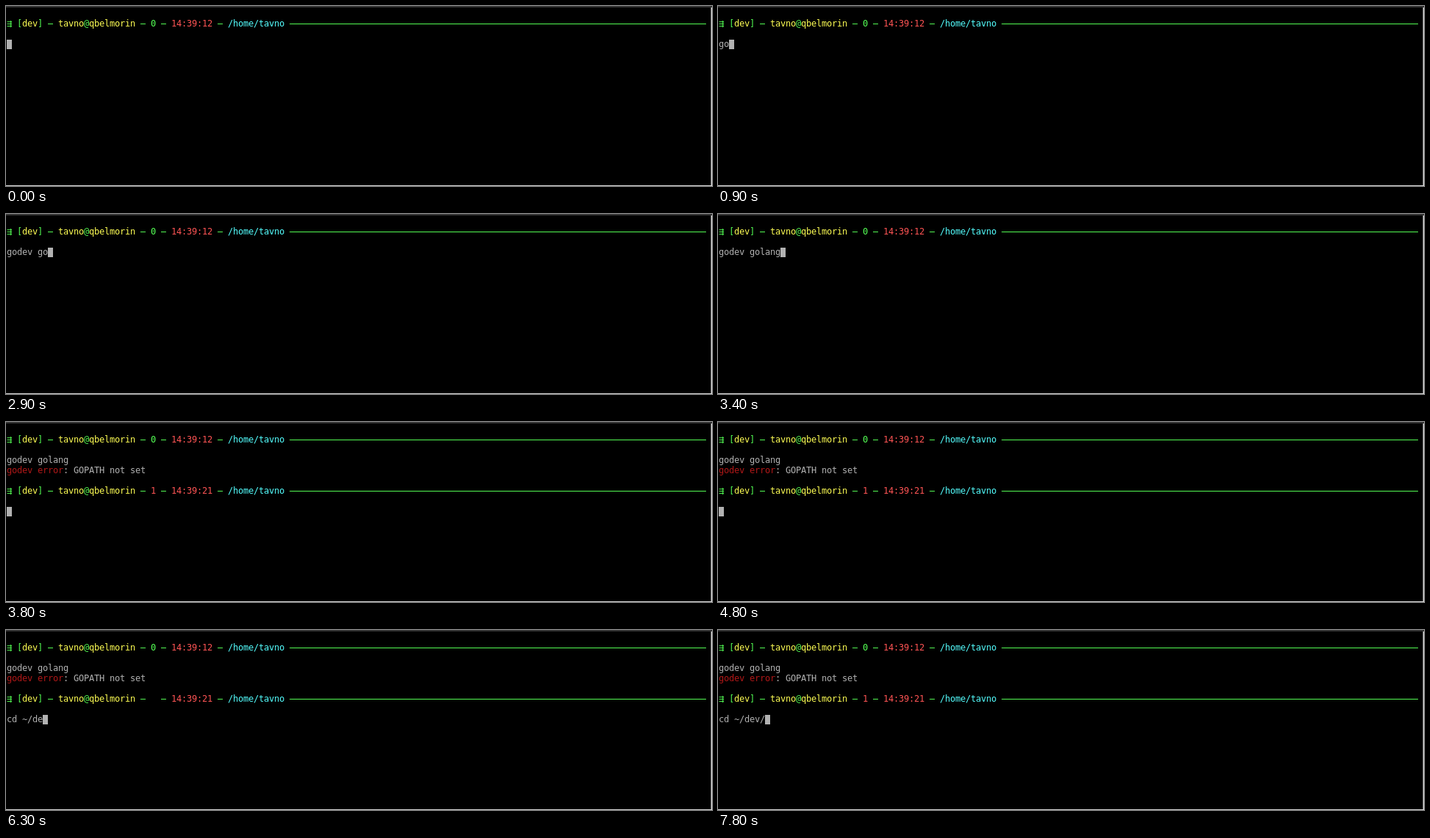
An HTML page for the animation above (8 s loop, 961 px wide and 246 px high).

```html
<!DOCTYPE html>
<html lang="en">
<head>
<meta charset="utf-8">
<title>Terminal session</title>
<style>
  html, body { margin: 0; width: 100%; height: 100%; overflow: hidden; background: #000; }
  svg { display: block; }
  text { font: 12px "DejaVu Sans Mono", monospace; white-space: pre; }
</style>
</head>
<body>
<svg id="stage" width="961" height="246" viewBox="0 0 961 246"></svg>
<script>
const LOOP = 8000, CELL = 7, LINE = 14, LEFT = 1, BASE = 28;
const GREEN = '#54ff54', YELLOW = '#ffff54', RED = '#ff5454', CYAN = '#54ffff';
const GREY = '#b2b2b2', DARK_RED = '#b21818';
const USER = 'tavno', HOST = 'qbelmorin';
const RESULT_AT = 3800, BLINK = 500;

const stage = document.getElementById('stage');
const colX = col => LEFT + col * CELL;
const rowY = row => BASE + row * LINE;

function add(parent, tag, attrs) {
  const el = document.createElementNS('http://www.w3.org/2000/svg', tag);
  for (const key in attrs) el.setAttribute(key, attrs[key]);
  return parent.appendChild(el);
}

function rect(parent, x, y, width, height, fill) {
  return add(parent, 'rect', { x, y, width, height, fill, 'shape-rendering': 'crispEdges' });
}

// Every character sits in its own terminal cell.
function setText(el, str) {
  el.setAttribute('x', [...str].map((_, i) => colX(el.col + i)).join(' '));
  el.textContent = str;
}

function write(parent, row, col, str, fill) {
  const el = add(parent, 'text', { y: rowY(row), fill });
  el.col = col;
  setText(el, str);
  return el;
}

function prompt(parent, row, status, statusColor, clock) {
  const put = (col, str, fill) => write(parent, row, col, str, fill);
  const dash = (col, cells = 1) =>
    rect(parent, colX(col), rowY(row) - 4, cells * CELL, 1, GREEN);
  put(0, '⇶', GREEN);
  put(2, '[', GREEN);
  put(3, 'dev', YELLOW);
  put(6, ']', GREEN);
  put(10, USER, YELLOW);
  put(15, '@', GREEN);
  put(16, HOST, YELLOW);
  put(32, clock, RED);
  put(43, '/home/' + USER, CYAN);
  [8, 26, 30, 41].forEach(col => dash(col));
  dash(55, 81);
  return put(28, status, statusColor);
}

// Typed commands: the times at which each further part appears.
const first = [[800, 'g'], [900, 'go'], [1000, 'god'], [1100, 'gode'], [1300, 'godev'],
  [2200, 'godev '], [2900, 'godev go'], [3100, 'godev gol'], [3200, 'godev gola'],
  [3300, 'godev golan'], [3400, 'godev golang']];
const second = [[5400, 'c'], [5500, 'cd'], [5600, 'cd '], [5800, 'cd ~'], [6100, 'cd ~/'],
  [6200, 'cd ~/d'], [6300, 'cd ~/de'], [6500, 'cd ~/dev'], [6600, 'cd ~/dev/']];

const typed = (steps, t) => steps.reduce((str, [at, next]) => t >= at ? next : str, '');

rect(stage, 0, 0, 961, 246, '#000');
prompt(stage, 0, '0', GREEN, '14:39:12');
const command = write(stage, 2, 0, '', GREY);

const result = add(stage, 'g', {});
write(result, 3, 0, 'godev error', DARK_RED);
write(result, 3, 11, ': GOPATH not set', GREY);
const status = prompt(result, 5, '1', RED, '14:39:21');
const nextCommand = write(result, 7, 0, '', GREY);

const cursor = rect(stage, LEFT, 46, CELL, 13, GREY);

// Window edges
rect(stage, 959, 0, 1, 246, '#5a5a5a');
rect(stage, 960, 0, 1, 246, '#dcdcdc');
rect(stage, 0, 245, 961, 1, '#dcdcdc');
rect(stage, 0, 0, 961, 2, '#333');

function show(el, on) {
  el.setAttribute('visibility', on ? 'visible' : 'hidden');
}

function draw(t) {
  const done = t >= RESULT_AT;
  const line = typed(done ? second : first, t);
  setText(command, typed(first, t));
  setText(nextCommand, typed(second, t));
  result.setAttribute('display', done ? 'inline' : 'none');
  show(status, Math.floor((t - RESULT_AT) / BLINK) % 2 === 0);
  cursor.setAttribute('x', colX(line.length));
  cursor.setAttribute('y', rowY(done ? 7 : 2) - 10);
}

const start = performance.now();
function tick() {
  draw((performance.now() - start) % LOOP);
  requestAnimationFrame(tick);
}
tick();
</script>
</body>
</html>
```
